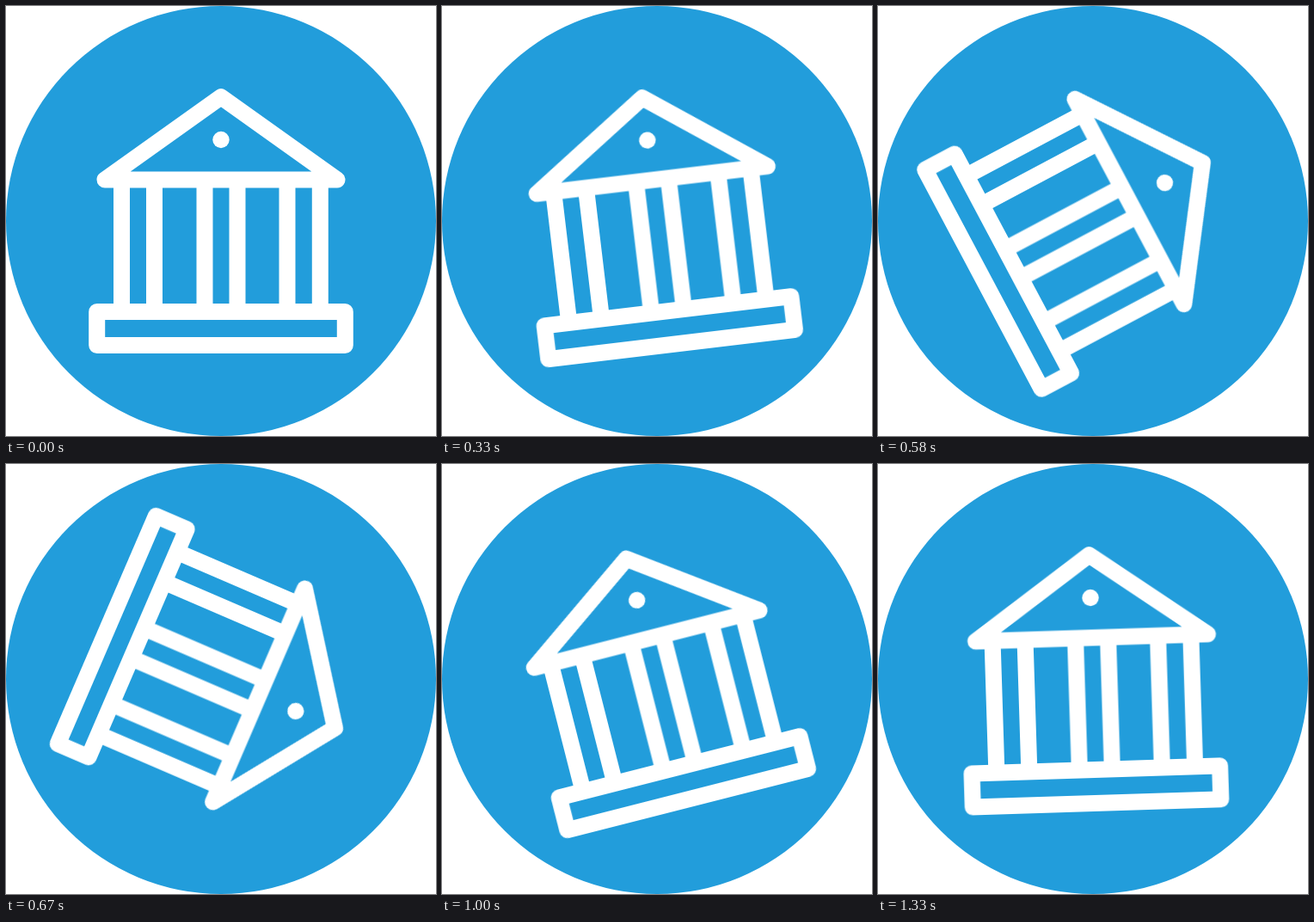
An HTML page for the animation above (1410 ms loop, 500 px wide and 500 px high).

```html
<!DOCTYPE html>
<html lang="en">
<head>
<meta charset="utf-8">
<title>Spinning bank icon</title>
<style>
  html, body { margin: 0; width: 100%; height: 100%; overflow: hidden; background: #fff; }
  svg { display: block; width: 100vw; height: 100vh; }
  #bank {
    transform-origin: 250px 250px;
    fill: none;
    stroke: #fff;
    stroke-width: 19;
    stroke-linejoin: round;
  }
</style>
</head>
<body>
<svg viewBox="0 0 500 500">
  <circle cx="250" cy="250" r="250" fill="#229ddb"/>
  <g id="bank">
    <path d="M115 202 250 105.7 385 202Z"/>
    <path d="M134.5 202V355M172.5 202V355M231 202V355M269 202V355M327 202V355M365.3 202V355"/>
    <rect x="105.7" y="355.5" width="288.6" height="39"/>
    <circle cx="250" cy="155.5" r="9.7" fill="#fff" stroke="none"/>
  </g>
</svg>
<script>
  const LOOP = 1410;
  const FPS = 12;

  // Wind up, full turn, settle: one pose in degrees per step.
  const angles = [
    0, -2, -5.5, -8, -6.8, 4, 25.2, 62, 113.3,
    185, 256.6, 315, 345.7, 359, 362, 360, 358.2
  ];

  const stepTime = i => Math.round(i * 100 / FPS) * 10;
  const pose = (deg, time) => ({
    transform: `rotate(${deg}deg)`,
    offset: time / LOOP,
    easing: 'step-end'
  });

  const frames = angles.map((deg, i) => pose(deg, stepTime(i)));
  frames.push(pose(360, LOOP));

  document.getElementById('bank').animate(frames, { duration: LOOP, iterations: Infinity });
</script>
</body>
</html>
```
